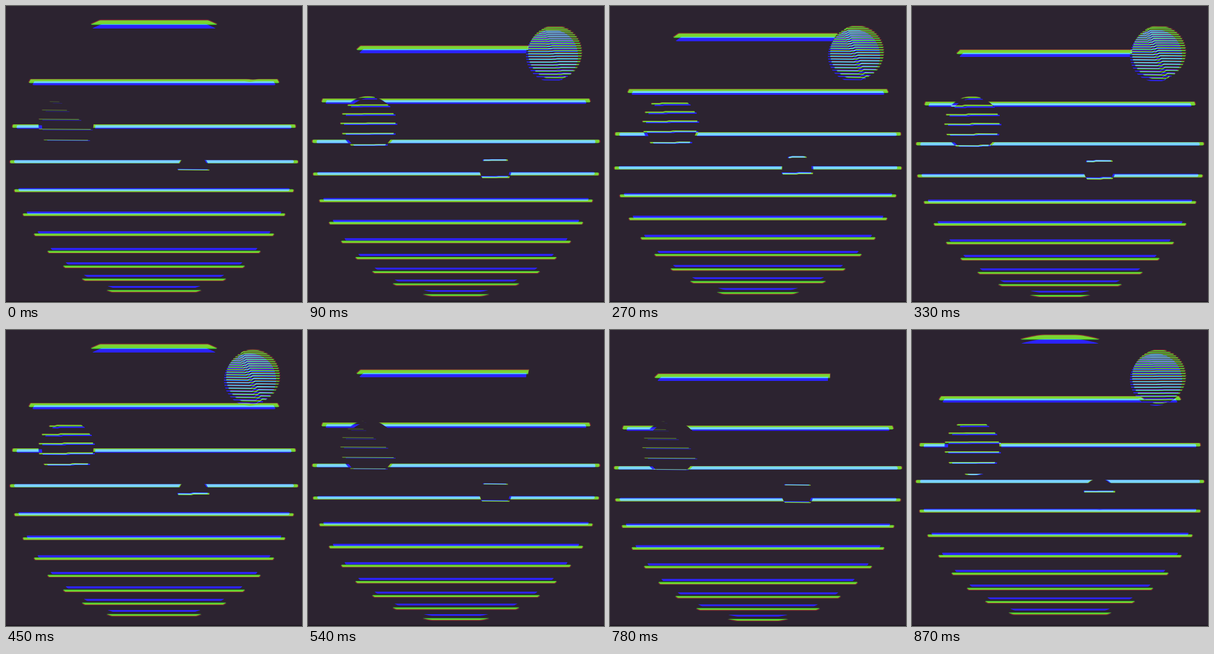
Write an HTML page with a canvas that moves like this. It is 500x500 px and loops after 900 ms.

```html
<!DOCTYPE html>
<html>
<head>
<meta charset="utf-8">
<style>
html, body { margin: 0; overflow: hidden; background: #2c2330; }
canvas { display: block; }
</style>
</head>
<body>
<canvas id="stage" width="500" height="500"></canvas>
<script>
const ctx = document.getElementById('stage').getContext('2d');
const STEP = 30, STEPS = 30, MID = 250, R = 243.5;

// Colour-split copies of the whole scene, scaled about the middle
const layers = [
  { color: '#7a2a30', scale: 1.006 },
  { color: '#44d42c', scale: 1 },
  { color: '#2020ff', scale: 0.971 }
];

// lineY gives the height of a sphere's line at slot v
const spheres = [
  { x: 417, y: 79, r: 45.5, first: 0, last: 23, width: 1.7, bend: 1,
    lineY: v => 33 + 2.6 * v + 0.07 * v * v },
  { x: 101.5, y: 199, r: 46.5, first: -1, last: 5, width: 2.3, bend: 0.4, faint: true,
    lineY: v => 162 + 13.7 * v + 0.5 * v * v + 0.03 * v ** 3 },
  { x: 317, y: 277, r: 26.5, first: -1, last: 1, width: 2.6, bend: 0.4, thin: true,
    lineY: v => 277 + 29.5 * v + 3 * v * v }
];

function stroke(width, ...points) {
  ctx.lineWidth = width;
  ctx.beginPath();
  points.forEach(([x, y]) => ctx.lineTo(x, y));
  ctx.stroke();
}

function circle(path, x, y, r) {
  path.moveTo(x + r, y);
  path.arc(x, y, r, 0, 2 * Math.PI);
}

const disc = new Path2D();
circle(disc, MID, MID, R);
const outside = new Path2D();
outside.rect(-50, -50, 600, 600);
spheres.forEach(s => circle(outside, s.x, s.y, s.r));

function drawFloor(phase) {
  ctx.save();
  ctx.clip(disc);
  ctx.clip(outside, 'evenodd');
  ctx.lineCap = 'round';
  for (let k = -1; k < 12; k++) {
    const depth = k + phase + 6.6;
    const y = 780.4 - 4966 / depth, w = 50 / depth;
    const dy = Math.abs(y - MID);
    if (dy > 240) continue;
    const inner = Math.max(0, dy - w / 2);
    const half = Math.sqrt(R * R - inner * inner) - w / 2;
    stroke(w, [MID - half, y], [MID + half, y]);
  }
  ctx.restore();
}

function drawSphere(s, phase, step) {
  const bright = step % 2 === 1;
  if (!bright && !s.faint && !s.thin) return;
  const clip = new Path2D();
  circle(clip, s.x, s.y, s.r);
  ctx.save();
  ctx.clip(clip);
  const bend = 3 * s.bend * Math.sin(Math.PI * step / STEPS);
  for (let k = s.first; k <= s.last; k++) {
    const v = k + phase, y = s.lineY(v), dy = y - s.y;
    if (Math.abs(dy) > s.r - 1) continue;
    const half = Math.sqrt(s.r * s.r - dy * dy);
    const left = s.x - half, right = s.x + half;
    if (bright) {
      const fold = s.x + dy * 0.4;
      stroke(s.width, [left, y + bend / 3], [fold - 4, y + bend / 2],
        [fold, y - bend / 2], [right, y - bend / 3]);
    } else {
      const part = s.faint ? Math.min(1, 0.3 + v * 0.22) : 1;
      if (part <= 0) continue;
      ctx.globalAlpha = s.faint ? Math.min(0.9, part) : 1;
      stroke(s.thin ? 1.5 : 1, [left, y - 0.5], [left + 2 * half * part, y]);
    }
  }
  ctx.restore();
}

function draw(now) {
  const step = Math.floor(now / STEP) % STEPS;
  const phase = step / 7.5 % 1;
  ctx.globalCompositeOperation = 'source-over';
  ctx.fillStyle = '#2c2330';
  ctx.fillRect(0, 0, 500, 500);
  ctx.fillStyle = '#1b161e';
  ctx.fillRect(0, 498.5, 500, 1.5);
  ctx.globalCompositeOperation = 'lighten';
  for (const { color, scale } of layers) {
    ctx.save();
    ctx.translate(MID, MID);
    ctx.scale(scale, scale);
    ctx.translate(-MID, -MID);
    ctx.strokeStyle = color;
    drawFloor(phase);
    spheres.forEach(s => drawSphere(s, phase, step));
    ctx.restore();
  }
}

const start = performance.now();
function tick() {
  draw(performance.now() - start);
  requestAnimationFrame(tick);
}
tick();
</script>
</body>
</html>
```
